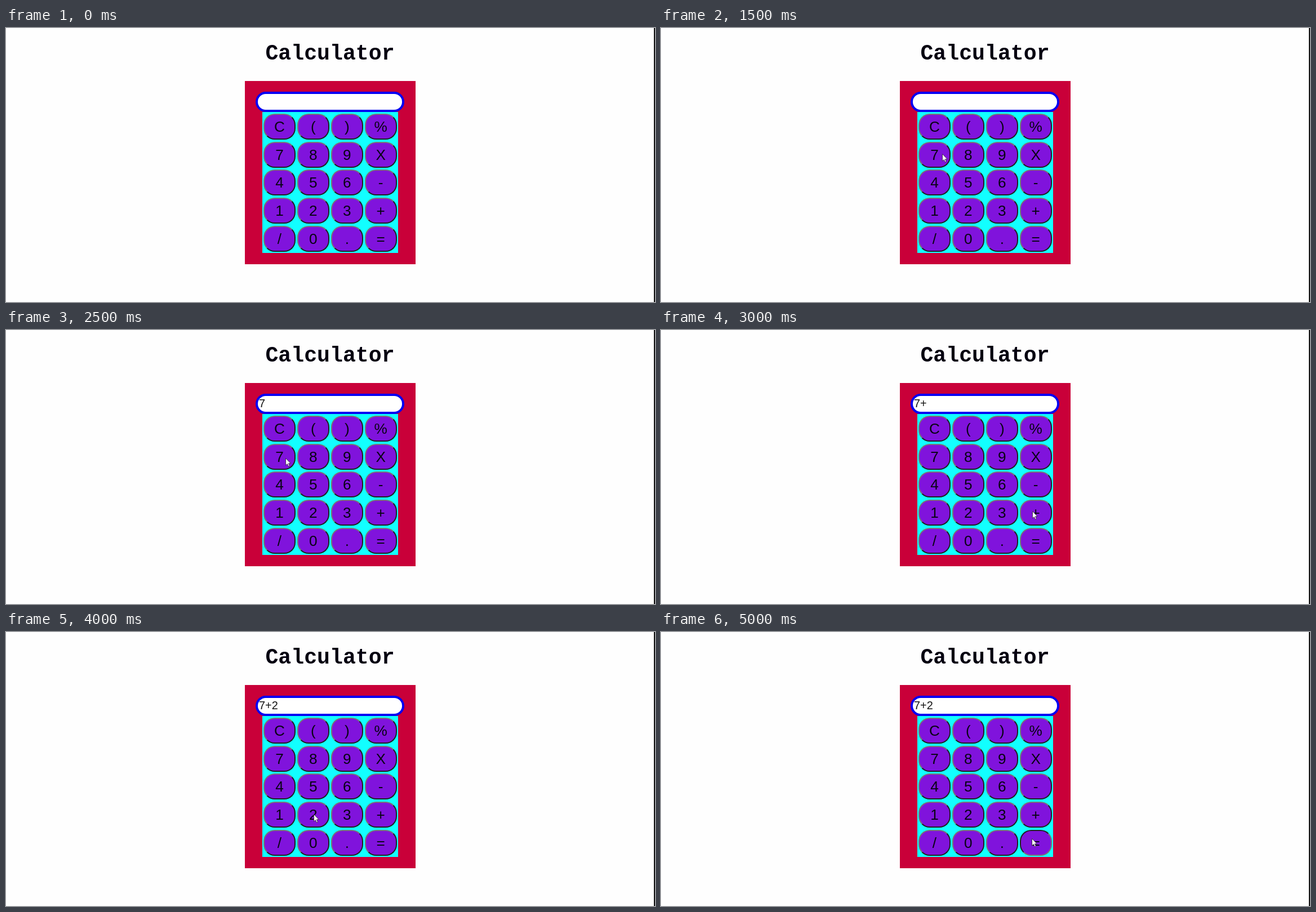
Write an HTML page that moves like this. It is 1152 px wide and 486 px high and loops after 5500 ms.

```html
<!DOCTYPE html>
<html lang="en">
<head>
<meta charset="utf-8">
<title>Calculator</title>
<style>
  html, body { margin: 0; width: 100%; height: 100%; overflow: hidden; background: #fefefe; }
  #stage { position: relative; width: 1152px; height: 486px; overflow: hidden; }
  #stage > * { position: absolute; box-sizing: border-box; margin: 0; }
  h1 {
    left: 423px; top: 24px; width: 304px; text-align: center; white-space: nowrap;
    font: bold 38.2px/44px "Liberation Mono", monospace; color: #040010;
  }
  .body { left: 423.5px; top: 93.5px; width: 303.5px; height: 325px; background: #c90039; }
  .pad { left: 455px; top: 149px; width: 241px; height: 250px; background: #12ffff; }
  #screen {
    left: 443px; top: 113px; width: 264px; height: 36px; padding-left: 2px;
    border: 4px solid #0000f2; border-radius: 18px; background: #fff;
    font: 19.9px/27px "Liberation Sans", sans-serif; color: #151515; white-space: pre;
  }
  .key {
    width: 57px; height: 46px; border: 2px outset #767676; border-radius: 20px;
    background: #8013dc; color: #080414; text-align: center;
    font: 26.2px/42px "Liberation Sans", sans-serif;
  }
  .key.down { border-style: inset; }
  .edge { left: 1150px; top: 0; width: 2px; height: 486px; background: #111; }
  #cursor { left: 0; top: 0; overflow: visible; }
</style>
</head>
<body>
<div id="stage">
  <h1>Calculator</h1>
  <div class="body"></div>
  <div class="pad"></div>
  <div id="screen"></div>
  <div class="edge"></div>
  <svg id="cursor" width="12" height="18">
    <path d="M.5 .5V13L3.4 10.4L5.4 15L7.4 14.1L5.5 9.7H9.3Z" fill="#fff" stroke="#3b2b48" stroke-width=".9"/>
  </svg>
</div>
<script>
const STEP = 500;
const LOOP = 5500;
const stage = document.getElementById('stage');
const screenBox = document.getElementById('screen');
const cursor = document.getElementById('cursor');

const keys = {};
[...'C()%789X456-123+/0.='].forEach((label, i) => {
  const key = document.createElement('div');
  key.className = 'key';
  key.textContent = label;
  key.style.left = 457 + (i % 4) * 59.9 + 'px';
  key.style.top = 152 + Math.floor(i / 4) * 49.7 + 'px';
  stage.insertBefore(key, cursor);
  keys[label] = key;
});

// One pointer position per step; null while it is off stage.
const pointer = [
  null, [329, 0], [482, 203], [499, 223], [498, 225], [496, 227],
  [659, 321], [597, 313], [546, 323], [607, 338], [658, 366]
];
const typed = [[4, '7'], [6, '+'], [8, '2']];

function draw(t) {
  const step = Math.floor((t % LOOP) / STEP);
  const at = pointer[step];
  cursor.style.visibility = at ? 'visible' : 'hidden';
  if (at) cursor.style.transform = `translate(${at[0]}px, ${at[1]}px)`;
  screenBox.textContent = typed.filter(([from]) => step >= from).map(([, c]) => c).join('');
  keys['='].classList.toggle('down', step === 10);
}

const start = performance.now();
function tick() {
  draw(performance.now() - start);
  requestAnimationFrame(tick);
}
tick();
</script>
</body>
</html>
```
